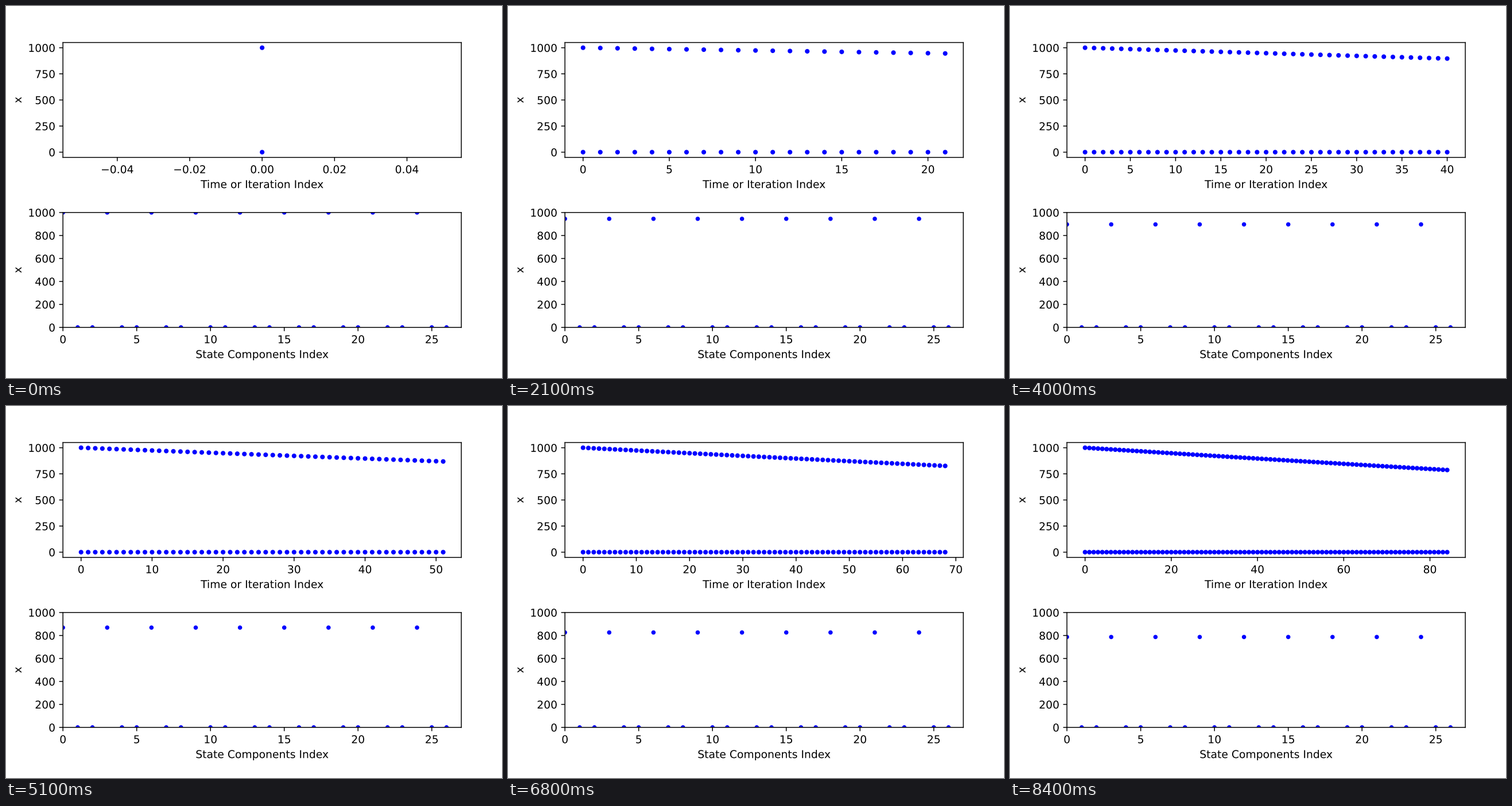
Animation, 864 px wide and 648 px high, one loop 8.5 s. Source, as a matplotlib script:

```python
import numpy as np
import matplotlib.pyplot as plt
from matplotlib.animation import FuncAnimation
from matplotlib.patheffects import Stroke

W, H, DPI = 864, 648, 135
FRAMES, INTERVAL = 85, 100
SIZE = 27
LEFT, WIDTH, HEIGHT = 99.2, 693.9, 200.1

# Draw lines, markers and glyphs as smooth paths, free of the pixel grid.
plt.rcParams.update({
    "font.family": "DejaVu Sans",
    "text.hinting": "none",
    "path.effects": [Stroke(snap=False)],
})
fig = plt.figure(figsize=(W / DPI, H / DPI), dpi=DPI, facecolor="white")


def add_panel(top, xlabel):
    """Axes with the given top edge, in pixels from the top of the figure."""
    bottom = H - top - HEIGHT
    ax = fig.add_axes([LEFT / W, bottom / H, WIDTH / W, HEIGHT / H])
    ax.set_xlabel(xlabel)
    ax.set_ylabel("x")
    return ax


def level(t):
    """Value of the decaying components; all others stay at zero."""
    return 1000 - 2.64 * t + 0.0012 * t**2


history_ax = add_panel(63.6, "Time or Iteration Index")
state_ax = add_panel(359.7, "State Components Index")
state_ax.set_xlim(0, SIZE)
state_ax.set_ylim(0, 1000)

index = np.arange(SIZE)
decaying = index % 3 == 0
high, low = (history_ax.plot([0], [y], "b.", markersize=6.6)[0]
             for y in (level(0), 0))
(current,) = state_ax.plot(index, level(0) * decaying, "b.")


def update(i):
    t = np.arange(i + 1)
    high.set_data(t, level(t))
    low.set_data(t, 0 * t)
    history_ax.relim()
    history_ax.autoscale_view()
    current.set_ydata(level(i) * decaying)
    return high, low, current


anim = FuncAnimation(fig, update, frames=FRAMES, interval=INTERVAL,
                     init_func=lambda: update(0), repeat=True,
                     repeat_delay=0, blit=False)
plt.show()
```
